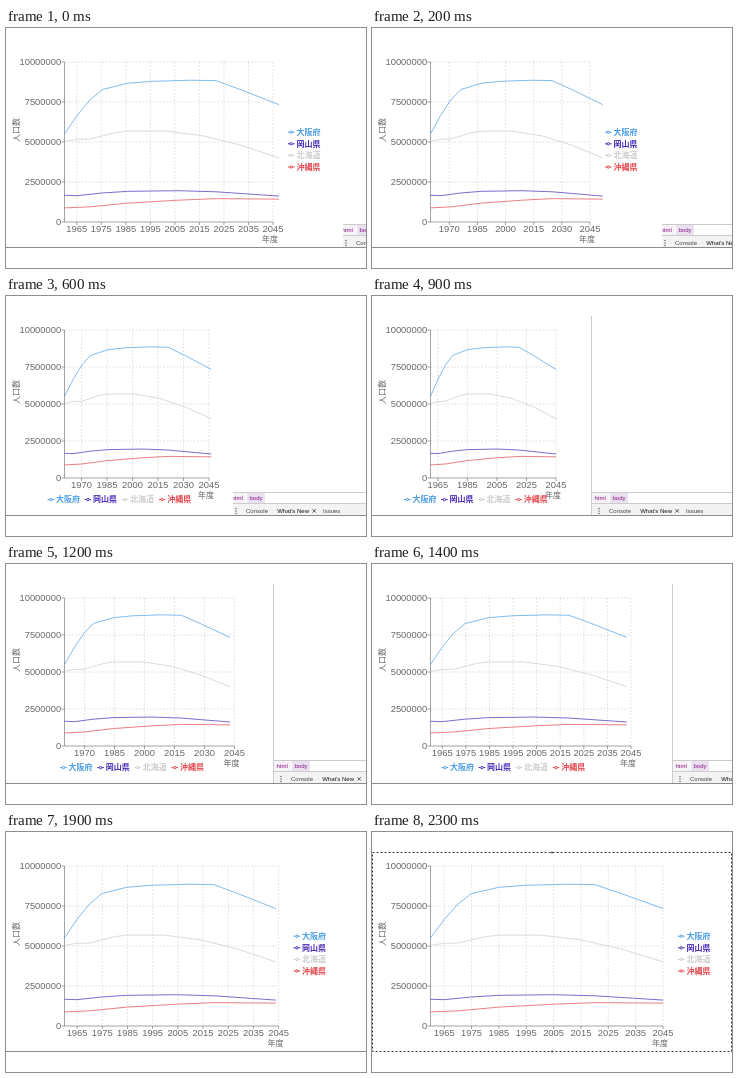
Write an HTML page that moves like this. It is 360x240 px and loops after 2400 ms.

```html
<!DOCTYPE html>
<html lang="ja">
<head>
<meta charset="utf-8">
<title>人口推移</title>
<style>
  html, body { margin: 0; width: 100%; height: 100%; overflow: hidden; background: #fff; }
  svg { display: block; width: 360px; height: 240px; }
  text { font: 9.4px "Liberation Sans", Arial, sans-serif; fill: #666; }
  .ja { font: 8px "Noto Sans CJK JP", "Noto Sans CJK", sans-serif; }
  .legend { font-weight: 700; }
  .tool { font-size: 6px; fill: #444; }
  .tag { fill: #881280; }
</style>
</head>
<body>
<svg id="stage" viewBox="0 0 360 240"></svg>
<script>
const STEP = 100, FRAMES = 24;
const LEFT = 58.5, TOP = 34, FIRST = 1960, LAST = 2045;
const SIDE_LEGEND_MIN = 285;

// Key points of the resize: [step, x]
const chartKeys = [[-1, 348], [0, 336], [2, 287], [4, 240], [6, 227], [8, 208], [9, 208],
  [14, 283], [17, 321], [21, 358], [23, 360]];
const panelKeys = [[0, 332], [2, 285], [6, 222], [8, 211], [9, 219], [14, 300], [18, 366], [23, 449]];

// Turning points of each population curve: [year, thousands]
const series = [
  { name: '大阪府', color: '#4d9fe6', keys: [[1960, 5505], [1965, 6657], [1970, 7620], [1975, 8279], [1985, 8668], [1995, 8797], [2010, 8860], [2020, 8835], [2030, 8262], [2045, 7335]] },
  { name: '岡山県', color: '#4a2cb8', keys: [[1960, 1670], [1965, 1645], [1975, 1814], [1985, 1917], [2005, 1957], [2020, 1888], [2045, 1620]] },
  { name: '北海道', color: '#cccccc', keys: [[1960, 5039], [1965, 5172], [1970, 5184], [1980, 5576], [1985, 5679], [2000, 5683], [2015, 5382], [2030, 4792], [2045, 4005]] },
  { name: '沖縄県', color: '#e2494f', keys: [[1960, 883], [1970, 945], [1985, 1179], [2005, 1362], [2020, 1460], [2045, 1428]] },
];

const stage = document.getElementById('stage');
const line = (x1, y1, x2, y2, color, width = 0.6, extra = '') =>
  `<line x1="${x1}" y1="${y1}" x2="${x2}" y2="${y2}" stroke="${color}" stroke-width="${width}" ${extra}/>`;
const label = (x, y, content, extra = '') => `<text x="${x}" y="${y}" ${extra}>${content}</text>`;
const rect = (x, y, w, h, fill) => `<rect x="${x}" y="${y}" width="${w}" height="${h}" fill="${fill}"/>`;

// Smooth cubic through the key points
function ease(keys, t) {
  const i = Math.max(0, keys.findIndex(([time]) => time >= t) - 1);
  const slope = k => {
    const [t0, v0] = keys[Math.max(0, k - 1)], [t1, v1] = keys[Math.min(keys.length - 1, k + 1)];
    return (v1 - v0) / (t1 - t0);
  };
  const [t0, v0] = keys[i], [t1, v1] = keys[i + 1];
  const span = t1 - t0, u = (t - t0) / span, s = u * u * (3 - 2 * u);
  return v0 + (v1 - v0) * s +
    span * u * (1 - u) * (slope(i) * (1 - u) - slope(i + 1) * u);
}

function layout(index) {
  const width = ease(chartKeys, index);
  const side = width >= SIDE_LEGEND_MIN;
  return { width, side, right: width - (side ? 69 : 24), bottom: side ? 194 : 182 };
}

function axes({ right, bottom }) {
  const dash = 'stroke-dasharray="1.7 1.7"';
  const perYear = (right - LEFT) / (LAST - FIRST);
  let span = 5;
  while (span * perYear < 23.1) span += 5;

  let out = '';
  for (let i = 0; i <= 4; i++) {
    const y = bottom - (bottom - TOP) * i / 4;
    if (i) out += line(LEFT, y, right, y, '#ccc', 0.6, dash);
    out += line(LEFT - 3, y, LEFT, y, '#666');
    out += label(55.2, y + 3.1, i * 2500000, 'text-anchor="end"');
  }
  for (let year = LAST; year > FIRST; year -= span) {
    const x = LEFT + (year - FIRST) * perYear;
    out += line(x, TOP, x, bottom, '#ccc', 0.6, dash);
    out += line(x, bottom, x, bottom + 3, '#666');
    out += label(x, bottom + 10, year, 'text-anchor="middle"');
  }
  out += line(LEFT, TOP, LEFT, bottom, '#666') + line(LEFT, bottom, right, bottom, '#666');
  const mid = (TOP + bottom) / 2;
  out += label(0, 0, '人口数', `class="ja" transform="translate(13 ${mid}) rotate(-90)"`);
  return out + label(right - 11, bottom + 19.8, '年度', 'class="ja"');
}

// Curves trail behind the axes while the chart is resized
function curves(now, before) {
  const change = now.right - before.right;
  const right = now.right - change * (change < 0 ? 0.5 : 0.28);
  const bottom = (now.bottom + before.bottom) / 2;
  return series.map(({ color, keys }) => {
    const points = keys.map(([year, value]) => {
      const x = LEFT + (right - LEFT) * (year - FIRST) / (LAST - FIRST);
      const y = bottom - (bottom - TOP) * value / 10000;
      return `${x.toFixed(2)},${y.toFixed(2)}`;
    });
    return `<polyline points="${points.join(' ')}" fill="none" stroke="${color}" stroke-width="0.7"/>`;
  }).join('');
}

function legend({ side, right, width }) {
  return series.map(({ name, color }, i) => {
    const x = side ? right + 15 : width / 2 - 72 + i * 37.1;
    const y = side ? 104.2 + i * 11.6 : 203.6;
    return line(x, y, x + 6.6, y, color, 1) +
      `<circle cx="${x + 3.3}" cy="${y}" r="1.2" fill="#fff" stroke="${color}"/>` +
      label(x + 8.4, y + 2.7, name, `class="ja legend" style="fill:${color}"`);
  }).join('');
}

function panel(index) {
  const x = Math.round(ease(panelKeys, index));
  if (x >= 360) return '';
  const covered = index < 7;
  const edge = covered ? x + 5 : x;
  const y = 217;
  let out = rect(x, 196, 360 - x, 11, '#fff') + rect(x, 207, 360 - x, 12, '#f3f3f3') +
    rect(x + 1, 197, 17, 10, '#f6f2f8') + rect(x + 19, 197, 18, 10, '#e9e0f0') +
    line(x, 196.5, 360, 196.5, '#ccc', 1) + line(x, 207.5, 360, 207.5, '#ccc', 1) +
    label(x + 3.5, 204.2, 'html', 'class="tool tag"') +
    label(x + 21.5, 204.2, 'body', 'class="tool tag"');
  for (const dotY of [212.5, 215, 217.5]) out += `<circle cx="${x + 8}" cy="${dotY}" r="0.7" fill="#555"/>`;
  out += label(x + 18, y, 'Console', 'class="tool"') +
    label(x + 49.2, y, 'What\'s New', 'class="tool" style="fill:#111"') +
    `<path d="M${x + 84.5} 213.2l3.4 3.4m0-3.4l-3.4 3.4" stroke="#333" stroke-width="0.8"/>` +
    label(x + 95, y, 'Issues', 'class="tool"');
  if (!covered) out += line(x + 0.5, 20, x + 0.5, 219, '#ccc', 1);
  return `<clipPath id="uncovered"><rect x="${edge}" y="0" width="360" height="240"/></clipPath>` +
    `<g clip-path="url(#uncovered)">${out}</g>`;
}

function frameEdge(selected) {
  if (!selected) return line(0, 219.5, 360, 219.5, '#8c8c8c', 1);
  const handles = [20.5, 219.5].map(y => `<circle cx="180" cy="${y}" r="1" fill="#444"/>`).join('');
  return '<rect x="0.5" y="20.5" width="359" height="199" fill="none" stroke="#333" stroke-dasharray="2 2"/>' + handles;
}

function render(index) {
  const now = layout(index);
  stage.innerHTML = axes(now) + curves(now, layout(index - 1)) + legend(now) +
    panel(index) + frameEdge(index === FRAMES - 1);
}

const start = performance.now();
let shown = -1;
function tick() {
  const index = Math.floor((performance.now() - start) / STEP) % FRAMES;
  if (index !== shown) render(shown = index);
  requestAnimationFrame(tick);
}
tick();
</script>
</body>
</html>
```
